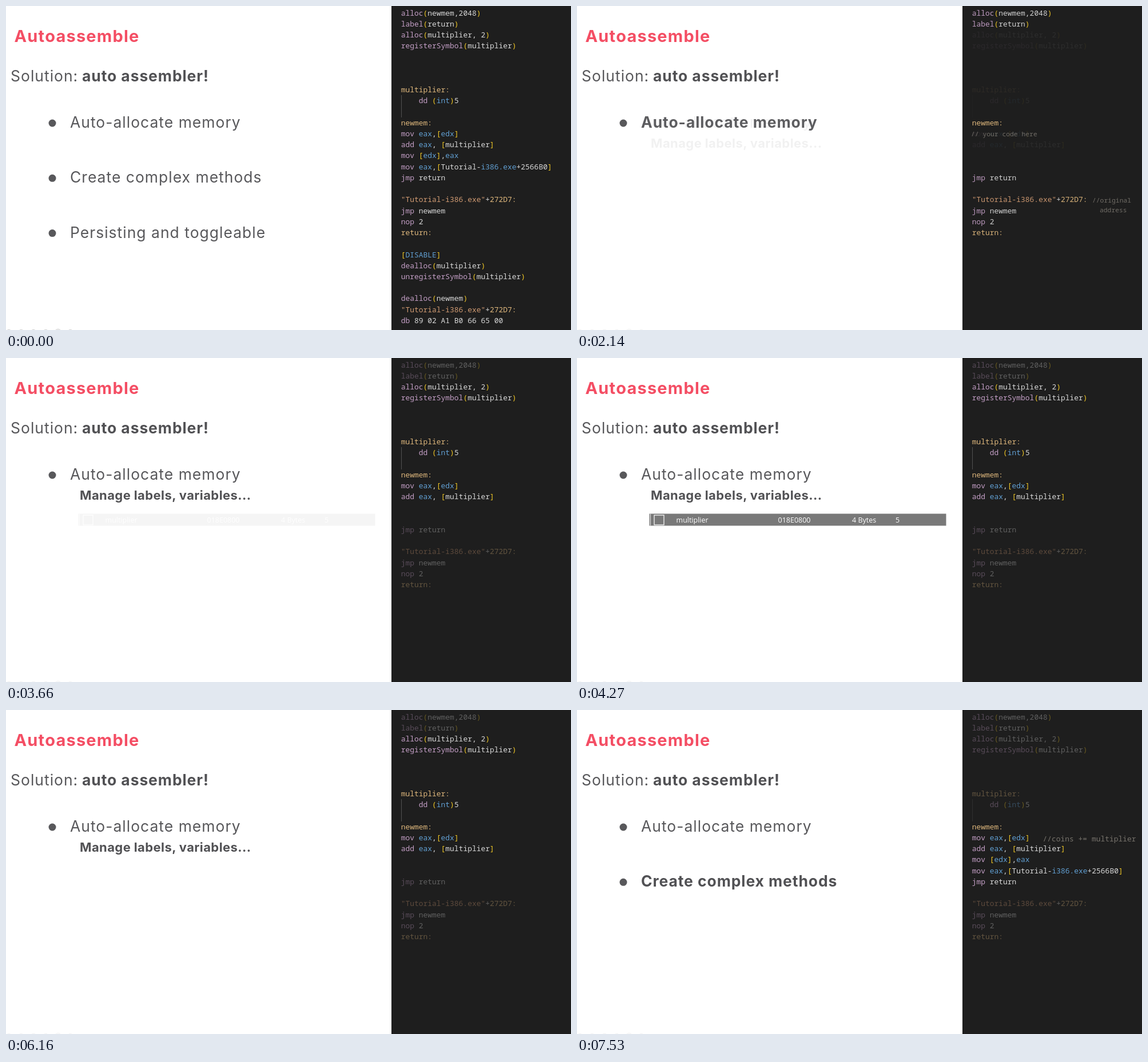
An HTML page that plays this animation: 988x567 px, repeating every 8000 ms.

```html
<!DOCTYPE html>
<html lang="en">
<head>
<meta charset="utf-8">
<title>Autoassemble</title>
<style>
  html, body { margin: 0; width: 100%; height: 100%; overflow: hidden; background: #fff; }
  svg { display: block; }
  text { white-space: pre; }
  .body { font: 26.5px Inter, sans-serif; letter-spacing: 1px; fill: #58585b; }
  .bold { font: 700 26.5px Inter, sans-serif; letter-spacing: .9px; fill: #515154; }
  .title { font: 700 29px Inter, sans-serif; letter-spacing: 1.2px; fill: #f44e64; }
  .sub { font: 700 22px Inter, sans-serif; letter-spacing: .4px; fill: #515154; }
  .cell { font: 12.5px "Open Sans", sans-serif; fill: #fff; }
  .code { font: 12.95px "Noto Sans Mono", monospace; fill: #d8d8d8; }
  .note { font: 11.35px "Noto Sans Mono", monospace; fill: #77736c; }
  .wide { font-size: 12.95px; }
  .op { fill: #c49fc6; }
  .bracket { fill: #f5cb25; }
  .word { fill: #619fd2; }
  .string { fill: #d09a72; }
  .label { fill: #deb77c; }
</style>
</head>
<body>
<svg id="stage" width="988" height="567" viewBox="0 0 988 567">
  <rect x="674" width="314" height="567" fill="#1e1e1e"/>
</svg>
<script>
const LOOP = 8000;
const DIM = 0.35, GHOST = 0.25;
const LINE = 19.23;
const stage = document.getElementById('stage');
const parts = [];

function add(name, attrs, content = '', parent = stage) {
  const el = document.createElementNS('http://www.w3.org/2000/svg', name);
  for (const key in attrs) el.setAttribute(key, attrs[key]);
  el.innerHTML = content;
  return parent.appendChild(el);
}

// A look string holds one visibility per slide: 1 shown, 0 hidden, d dimmed, g ghost.
function show(look, el) {
  const levels = [...look].map(c => ({ d: DIM, g: GHOST })[c] ?? +c);
  parts.push({ el, levels });
}

const label = (x, y, style, content, parent) => add('text', { x, y, class: style }, content, parent);

// Left side
label(14.5, 63, 'title', 'Autoassemble');
label(8, 132, 'body', 'Solution:');
label(133, 132, 'bold', 'auto assembler!');

function bullet(row, look, content, regularLook, boldLook) {
  const y = 213 + row * 96.3;
  show(look, add('circle', { cx: 81, cy: y - 8, r: 6.5, fill: '#58585b' }));
  show(regularLook, label(112, y, 'body', content));
  if (boldLook) show(boldLook, label(112, y, 'bold', content));
}
bullet(0, '1111', 'Auto-allocate memory', '1011', '0100');
bullet(1, '1001', 'Create complex methods', '1000', '0001');
bullet(2, '1000', 'Persisting and toggleable', '1000');
show('0010', label(129, 248, 'sub', 'Manage labels, variables...'));

for (let i = 0; i < 6; i++) {
  show('1ggg', add('circle', {
    cx: 5 + 21.5 * i, cy: i === 4 ? 571.5 : 572.5, r: 6, fill: 'none', stroke: '#c8c8c8'
  }));
}

// Table row
const row = add('g', {});
add('rect', { x: 126.5, y: 272.5, width: 519, height: 21, fill: '#585858' }, '', row);
add('path', { d: 'M128.5 272.5v21', stroke: '#ddd' }, '', row);
add('rect', { x: 135, y: 275, width: 17, height: 17, fill: 'none', stroke: '#f4f4f4', 'stroke-width': 1.3 }, '', row);
[[173.5, 'multiplier'], [351.5, '018E0800'], [481, '4 Bytes'], [557, '5']]
  .forEach(([x, content]) => label(x, 288, 'cell', content, row));

// Code panel
const TOKENS = [
  ['string', '"[^"]*"'],
  ['label', '\\w+:'],
  ['op', '\\b(?:(?:de)?alloc|label|(?:un)?registerSymbol|mov|add|jmp|nop|dd|db)\\b'],
  ['word', '\\b(?:eax|edx|int|DISABLE|i386\\.exe)\\b'],
  ['bracket', '[\\[\\]()]']
];
const tokenPattern = new RegExp(TOKENS.map(([name, rule]) => `(?<${name}>${rule})`).join('|'), 'g');

const highlight = code => code.replace(tokenPattern, (match, ...rest) => {
  const groups = rest.at(-1);
  const kind = Object.keys(groups).find(name => groups[name] !== undefined);
  return `<tspan class="${kind}">${match}</tspan>`;
});

const listing = [
  [0, '11dd', 'alloc(newmem,2048)'],
  [1, '11dd', 'label(return)'],
  [2, '101d', 'alloc(multiplier, 2)'],
  [3, '101d', 'registerSymbol(multiplier)'],
  [7, '101d', 'multiplier:'],
  [8, '101d', '    dd (int)5'],
  [10, '1111', 'newmem:'],
  [11, '1011', 'mov eax,[edx]'],
  [12, '1011', 'add eax, [multiplier]'],
  [13, '1001', 'mov [edx],eax'],
  [14, '1001', 'mov eax,[Tutorial-i386.exe+2566B0]'],
  [15, '11d1', 'jmp return'],
  [17, '11dd', '"Tutorial-i386.exe"+272D7:'],
  [18, '11dd', 'jmp newmem'],
  [19, '11dd', 'nop 2'],
  [20, '11dd', 'return:'],
  [22, '1000', '[DISABLE]'],
  [23, '1000', 'dealloc(multiplier)'],
  [24, '1000', 'unregisterSymbol(multiplier)'],
  [26, '1000', 'dealloc(newmem)'],
  [27, '1000', '"Tutorial-i386.exe"+272D7:'],
  [28, '1000', 'db 89 02 A1 B0 66 65 00']
];
for (const [line, look, code] of listing) {
  show(look, label(690.7, 16.5 + line * LINE, 'code', highlight(code)));
}
show('101d', add('path', { d: 'M691.5 156v39', stroke: '#505050' }));

const SLASHES = '/'.repeat(2);
show('0100', label(689, 228, 'note', SLASHES + ' your code here'));
show('0100', label(901, 343.5, 'note', SLASHES + 'original'));
show('0100', label(914, 360.5, 'note', 'address'));
show('0001', label(814.5, 229.5, 'note wide', SLASHES + 'coins += multiplier'));

// Fades advance in a few even, visible steps.
function fade(t, start, end, steps) {
  if (t < start) return 0;
  const step = Math.floor((t - start) / (end - start) * (steps - 1) + 1e-6);
  const u = Math.min(1, (step + 1) / steps);
  return u * u * (3 - 2 * u);
}

function draw() {
  const t = performance.now() % LOOP;
  const position = fade(t, 500, 1260, 7) + fade(t, 2140, 2780, 6) + fade(t, 6780, 7530, 7);
  const from = Math.min(2, Math.floor(position));
  const mix = position - from;
  for (const { el, levels } of parts) {
    el.setAttribute('opacity', levels[from] * (1 - mix) + levels[from + 1] * mix);
  }
  row.setAttribute('opacity', fade(t, 3660, 4400, 7) - fade(t, 5290, 6160, 8));
  requestAnimationFrame(draw);
}
draw();
</script>
</body>
</html>
```
